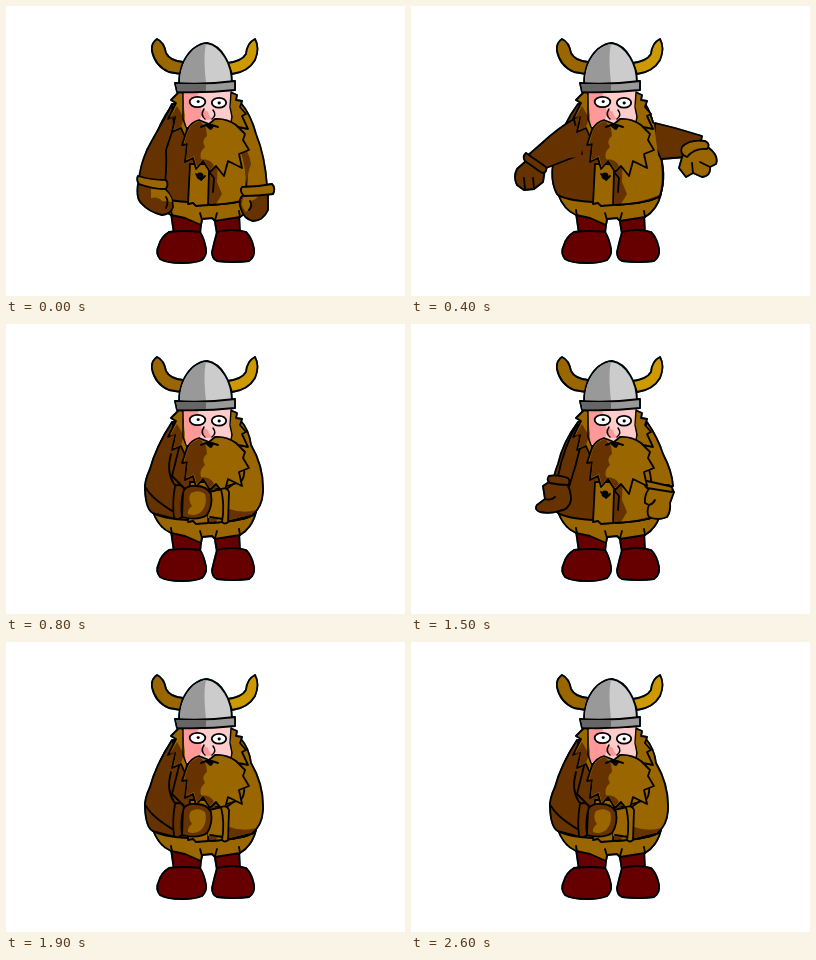
These frames come from a looping animation (399x290 px, 3 s). An HTML page:

```html
<!DOCTYPE html>
<html lang="en">
<head>
<meta charset="utf-8">
<title>Viking</title>
<style>
html, body { margin: 0; width: 100%; height: 100%; overflow: hidden; background: #fff; }
svg { display: block; width: 100%; height: 100%; }
.man { stroke: #000; stroke-width: 1.8; stroke-linejoin: round; stroke-linecap: round; fill: none;
  filter: drop-shadow(0 0 .6px #0077aa); }
.d { fill: #663300; } .l { fill: #996600; } .r { fill: #660000; }
.n { stroke: none; }

/* hard switches on a 100 ms grid: 3.333% per step */
.pose, .lid { visibility: hidden; animation: 3s step-end infinite; }
.rest { animation-name: rest; }
.open { animation-name: open; }
.out { animation-name: out; }
.wide { animation-name: wide; }
.sweep { animation-name: sweep; }
.near { animation-name: near; }
.fold { animation-name: fold; }
.half { animation-name: half; }
.shut { animation-name: shut; }
.eyes { animation: eyes 3s step-end infinite; }
@keyframes rest { 0% { visibility: visible } 3.333%, 100% { visibility: hidden } }
@keyframes open { 0%, 6.666%, 53.333%, 100% { visibility: hidden } 3.333%, 50% { visibility: visible } }
@keyframes out { 0%, 10%, 56.666%, 100% { visibility: hidden } 6.666%, 53.333% { visibility: visible } }
@keyframes wide { 0%, 13.333%, 60%, 100% { visibility: hidden } 10%, 56.666% { visibility: visible } }
@keyframes sweep { 0%, 16.666%, 100% { visibility: hidden } 13.333% { visibility: visible } }
@keyframes near { 0%, 20%, 63.333%, 100% { visibility: hidden } 16.666%, 60% { visibility: visible } }
@keyframes fold { 0%, 50% { visibility: hidden } 20%, 63.333%, 100% { visibility: visible } }
@keyframes half { 0%, 20%, 26.666%, 80%, 86.666%, 100% { visibility: hidden }
  16.666%, 23.333%, 76.666%, 83.333% { visibility: visible } }
@keyframes shut { 0%, 23.333%, 83.333%, 100% { visibility: hidden } 20%, 80% { visibility: visible } }
@keyframes eyes { 0%, 26.666%, 86.666%, 100% { visibility: visible } 16.666%, 76.666% { visibility: hidden } }
</style>
</head>
<body>
<svg viewBox="0 0 399 290" preserveAspectRatio="none">
<g class="man">

  <!-- legs and boots -->
  <path class="r" d="M165 207L168 228H194L196 210ZM208 210L211 228H234L233 207Z"/>
  <path class="r" d="M163 226Q155 231 153 239Q149 247 154 253Q160 257 176 257Q190 257 196 254Q201 249 200 243Q198 232 194 226Q180 224 163 226Z"/>
  <path class="r" d="M211 226Q208 237 206 246Q206 253 211 255Q228 257 243 255Q249 251 248 243Q246 232 240 226Q226 222 211 226Z"/>

  <!-- trousers and tunic -->
  <path class="l" d="M147 188Q153 204 165 209L179 212L195 219L196 213L206 212L209 215L234 211Q246 204 250 188Z"/>
  <path d="M165 204L166 210M194 207L196 214M211 207L209 214M233 205L234 211"/>
  <path class="d" d="M167 98C158 110 151 122 147 140C140 157 139 176 146 188Q152 194 182 196L205 199Q239 197 249 190C254 176 252 158 247 140C244 120 240 105 232 95Z"/>
  <path class="l n" d="M226 100L233 97Q244 116 247 140Q254 172 248 189Q232 196 210 198L216 188L211 176L212 150Z"/>
  <path d="M232 95C240 105 244 120 247 140C253 158 254 176 249 190Q239 197 205 199"/>
  <path class="l" d="M184 158L182 198L187 197L190 200L202 199L203 166L206 158Z"/>
  <path d="M203 166L208 172L207 186"/>
  <circle cx="194" cy="170" r="2.6" fill="#000"/>
  <path d="M190 168L195 174L199 170"/>

  <!-- arms behind the beard -->
  <g class="pose rest">
    <path class="d" d="M166 98C159 113 149 128 141 144Q134 160 133 174L158 184Q161 166 160 144L168 120Z"/>
    <path class="l" d="M235 97Q245 109 250 128Q259 150 261 180L240 184Q243 160 234 136L226 120Z"/>
    <path class="d n" d="M235 136Q244 148 245 158Q241 168 241 180Q239 160 235 146Z"/>
    <path class="d" d="M132 178Q130 192 135 197Q143 206 156 209Q165 208 167 201Q167 190 159 183Z"/>
    <path class="l n" d="M145 183L159 184Q166 190 166 196L156 195Q152 190 145 192Z"/>
    <path class="l" d="M132 170Q145 174 160 174Q163 178 160 183Q146 183 133 178Q130 174 132 170Z"/>
    <path d="M160 191Q163 195 160 202"/>
    <path class="d" d="M238 188Q231 194 235 203Q238 213 247 215Q257 215 262 204L262 188Z"/>
    <path class="l n" d="M239 189H253Q250 194 244 195Q245 202 240 206Q232 198 239 189Z"/>
    <path class="l" d="M236 181Q251 181 266 178Q270 182 267 188Q252 190 238 190Q233 185 236 181Z"/>
    <path d="M244 195Q247 200 243 204"/>
  </g>

  <g class="pose open">
    <path class="d" d="M166 100C157 116 151 132 147 152L158 163Q165 142 170 120Z"/>
    <path class="l" d="M236 98Q247 114 252 130Q261 147 262 162L240 166Q242 146 228 122Z"/>
    <path class="d" d="M138 158L132 162L134 175L126 181Q123 186 129 188Q139 190 148 187Q158 186 160 176Q160 164 154 158Z"/>
    <path class="d" d="M138 152Q147 150 157 154Q160 158 157 161Q148 161 139 159Q135 156 138 152Z"/>
    <path d="M134 175Q140 177 144 173"/>
    <path class="l" d="M239 163Q233 171 234 179L238 181Q235 188 238 193Q247 197 256 193Q260 187 259 179L263 168L258 161Z"/>
    <path class="l" d="M236 157L258 162Q263 163 261 168L236 164Q232 161 236 157Z"/>
    <path d="M238 181Q242 180 244 176"/>
  </g>

  <g class="pose out">
    <path class="d" d="M163 114Q156 123 147 125L124 135L139 149L145 147L168 150L174 118Z"/>
    <path class="d n" d="M160 123L144 144L170 151L174 118Z"/>
    <path class="d" d="M115 144L101 149Q90 157 88 167L90 178L96 182L98 177L103 184L110 184L109 174L117 169Q117 158 128 150Z"/>
    <path d="M99 163L98 177M105 159L104 171L109 174"/>
    <path class="d" d="M105 132Q101 136 107 141Q118 150 132 151Q140 148 132 144Q116 140 105 132Z"/>
    <path class="d" d="M244 118L252 124L266 130L263 151L250 155L243 140Z"/>
    <path class="l n" d="M230 112L243 119L247 150L230 145Z"/>
    <path class="l" d="M264 127L273 122Q281 119 286 124L285 131L291 133Q299 138 298 145L294 151L289 151Q286 158 278 156L271 152L261 151L256 144Q257 136 263 134Z"/>
    <path d="M264 127Q269 132 275 130M276 142L285 131M279 148L289 151M260 140Q266 145 272 143"/>
  </g>

  <g class="pose wide">
    <path class="d" d="M163 114Q150 123 119 131L121 151L149 150L170 148L174 118Z"/>
    <path class="d n" d="M160 120L145 148L170 150L174 118Z"/>
    <path class="d" d="M112 134L95 138L80 147Q75 153 77 158L84 157L79 168L84 173L92 167L92 176L98 179L104 169L114 163L119 152Z"/>
    <path d="M84 157L95 151M92 167L101 157"/>
    <path class="d" d="M110 128Q107 131 109 138L116 154Q120 158 124 153Q123 139 116 128Z"/>
    <path class="d" d="M244 117L256 121L273 125L271 147L250 153L243 138Z"/>
    <path class="l n" d="M230 112L243 118L247 149L230 145Z"/>
    <path class="l" d="M273 122L284 116Q290 113 294 117L290 123L304 121Q310 124 307 129L301 131Q310 133 309 139L301 142Q306 148 300 151L289 151L272 146Z"/>
    <path d="M290 123L284 129M301 131L291 133M301 142L291 140"/>
    <path class="l" d="M268 121Q273 118 276 124L277 146Q274 151 269 147Q264 134 268 121Z"/>
  </g>

  <g class="pose sweep">
    <path class="d" d="M163 113Q147 122 130 138L115 151L130 164L148 157L171 148Z"/>
    <path class="d n" d="M159 120L143 153L170 151L174 120Z"/>
    <path class="d" d="M115 155L106 163Q102 171 106 179L113 184L123 183L132 176L134 163Z"/>
    <path d="M113 172L114 183M122 172L123 182"/>
    <path class="d" d="M115 147Q111 151 114 155L131 167Q137 166 135 161Z"/>
    <path class="d" d="M244 117L264 122L291 130L287 150L250 153L243 138Z"/>
    <path class="l n" d="M230 112L243 118L247 149L230 145Z"/>
    <path class="l" d="M282 137L298 142Q308 150 305 158L299 161Q300 170 291 171L282 167L275 171L268 162L272 148Z"/>
    <path d="M299 161L289 156M282 167L281 157"/>
    <path class="l" d="M271 141Q278 133 294 135Q300 138 296 143Q283 142 276 151Q268 148 271 141Z"/>
  </g>

  <g class="pose near">
    <path class="d" d="M164 108Q154 123 142 140L130 154L121 167Q123 171 133 174L152 164L172 128Z"/>
    <path class="d" d="M139 148Q131 155 130 169Q131 179 140 181Q151 183 156 176Q159 166 157 152Q149 143 139 148Z"/>
    <path class="d" d="M243 117L264 124L294 133Q302 139 300 145L295 150L278 150L254 157L243 140Z"/>
    <path class="l n" d="M228 112L242 118L244 136L250 156L228 150Z"/>
    <path d="M236 102L244 117"/>
    <path class="l" d="M262 143Q277 141 290 148Q299 156 297 167Q294 171 290 169Q286 158 263 153Q254 149 262 143Z"/>
    <path class="l" d="M246 158Q255 152 266 155L284 159Q291 166 291 173L285 176L284 184L278 185Q276 192 270 191L263 186L252 188Q246 183 253 178L245 175L250 169L244 165Z"/>
    <path d="M253 178L260 179M278 185L273 181M250 169L256 170"/>
  </g>

  <g class="pose fold">
    <path class="d" d="M166 98C157 112 149 126 144 145Q138 158 139 166Q140 186 147 189L170 195L178 164L166 152L174 120Z"/>
    <path class="l" d="M235 97Q243 106 245 121Q258 143 257 168Q256 184 246 191L223 197L218 167L234 155L226 120Z"/>
    <path class="d n" d="M223 185Q238 190 250 186L245 191L223 196Z"/>
    <path d="M140 164Q146 175 168 188M165 130Q160 148 168 160L176 165M236 136Q241 150 235 158L210 165"/>
  </g>

  <!-- hair -->
  <path class="l" d="M173 86L165 94L170 97L162 113L170 109L166 126L175 122L180 133L184 88Z"/>
  <path class="d n" d="M171 100L164 112L170 110L168 124L175 121L178 112Z"/>
  <path class="l" d="M224 86L231 89L230 94L236 95L234 101L240 108L236 110L242 123L232 121L235 132L222 118Z"/>

  <!-- face -->
  <path class="n" fill="#ffcccc" d="M177 85H225V121H180Z"/>
  <path class="n" fill="#ff9999" d="M177 85H193Q189 94 194 101Q198 107 194 113L180 121Z"/>
  <path class="n" fill="#ff9999" d="M198 104Q194 111 201 114L208 113Q203 112 202 106Z"/>
  <path d="M177 86V113L180 121M225 86L224 101L226 111L224 120" stroke-width="1.4"/>
  <path d="M198 103Q194 109 199 113M207 104Q211 109 206 113" stroke-width="1.5"/>
  <g class="eyes">
    <ellipse cx="191.5" cy="96" rx="7.8" ry="5.2" fill="#fff"/>
    <ellipse cx="213" cy="96.8" rx="7.2" ry="4.9" fill="#fff"/>
    <path d="M192 95.6h.4M213 97h.4" stroke-width="2.8"/>
  </g>
  <g class="lid half">
    <path fill="#fff" d="M185 94L198 95L197 98H187ZM207 96L220 95L219 99H209Z"/>
  </g>
  <g class="lid shut">
    <path d="M185 97Q191 99 198 98M207 98Q213 100 220 98"/>
  </g>

  <!-- beard -->
  <path class="l" d="M193 114Q185 116 181 124L176 139L181 138L179 156L187 152L190 163L197 155L204 166L210 160L218 170L222 155L236 162L233 148L243 144L237 134L239 128L230 119Q220 112 209 113L203 118Z"/>
  <path class="d n" d="M194 115Q186 117 182 125L178 138L182 137L180 154L188 150L191 161L197 153L204 164L208 160Q205 153 195 153Q193 146 199 141Q195 134 201 130L200 122Z"/>
  <path d="M195 121L200 119L206 119L212 121M201 120L205 123L207 120" stroke-width="1.9"/>
  <path d="M201 120H207L204 123Z" fill="#000" stroke-width="1"/>

  <!-- clasped gloves, over the beard -->
  <g class="pose fold">
    <path class="l n" d="M203 167L218 164L219 195L202 194Z"/>
    <path d="M203 168L216 165M204 193L217 195"/>
    <path class="l" d="M215 165Q221 163 223 168L222 198Q219 201 216 198Q219 181 215 165Z"/>
    <path class="d" d="M177 167Q181 161 190 162Q201 162 205 170Q207 182 201 191Q192 197 176 193Z"/>
    <path class="l n" d="M185 169Q193 165 199 170Q202 179 196 187Q190 193 182 190Q181 186 186 182Q181 175 185 169Z"/>
    <path class="d" d="M169 162Q175 159 178 165Q174 179 176 193Q172 197 168 194Q166 179 169 162Z"/>
  </g>

  <!-- horns and helmet -->
  <path fill="#996600" d="M151 33Q145 37 146 45Q149 60 163 66L175 68L177 56Q164 55 160 47Q158 36 151 33Z"/>
  <path fill="#cc9900" d="M249 33Q254 42 249 54Q242 66 226 68L222 57Q236 55 240 48Q241 37 249 33Z"/>
  <path fill="#ccc" d="M173 78Q173 56 187 43Q195 37 201 37Q212 39 219 51Q226 62 226 78Z"/>
  <path class="n" fill="#999" d="M174 77Q174 57 187 44Q193 39 200 38Q197 50 200 77Z"/>
  <path fill="#999" d="M169 77Q198 79 229 75L229 84Q201 87 171 86Z"/>
  <path class="n" fill="#666" d="M170 78L200 78V85H172Z"/>
</g>
</svg>
</body>
</html>
```
